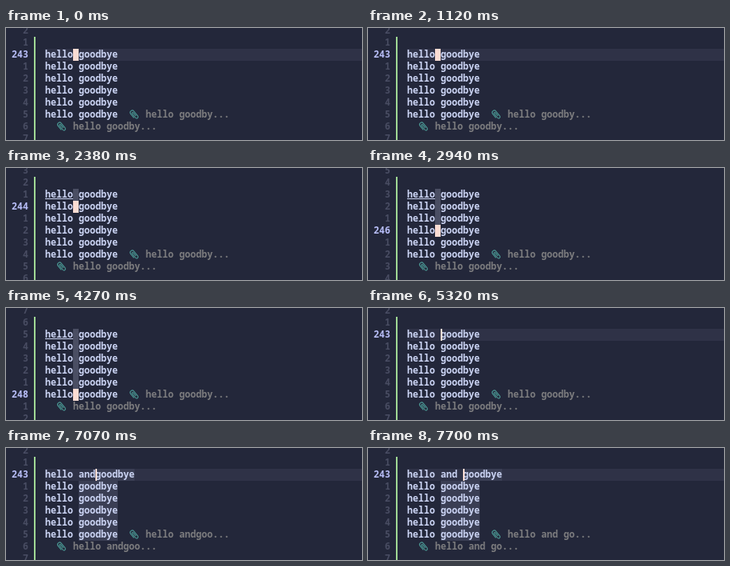
Animation of 446x140 px, one loop 8 s. Source, as an HTML page with a canvas:

```html
<!DOCTYPE html>
<html lang="en">
<head>
<meta charset="utf-8">
<title>Block insert</title>
<style>
html, body { margin: 0; width: 446px; height: 140px; overflow: hidden; background: #23273a; }
canvas { display: block; }
</style>
</head>
<body>
<canvas id="stage" width="446" height="140"></canvas>
<script>
const ctx = document.getElementById('stage').getContext('2d');
const CELL = 7, ROW = 15, LEFT = 49, TOP = 26, LOOP = 8000;
const BLOCK_MODE = 1540, INSERT_MODE = 5320, WORD_MARK = 5530;
const MOVES = [2170, 2450, 2730, 3010, 3150];
const KEYS = [6370, 6650, 6930, 7210];
const color = {
  bg: '#23273a', line: '#2f3247', mark: '#3a3e54', select: '#4a4e63',
  text: '#cdd6f6', dim: '#494d63', number: '#b9bffa', note: '#7d7d7f',
  cursor: '#fbdcd3', green: '#a0d995', clip: '#4b9995'
};

const colX = col => LEFT + col * CELL;
const rowY = row => TOP + row * ROW;
const countBefore = (times, t) => times.filter(time => time <= t).length;

function cells(col, row, count, fill) {
  ctx.fillStyle = fill;
  ctx.fillRect(colX(col), rowY(row), count * CELL, ROW);
}

function write(text, col, row, fill) {
  ctx.fillStyle = fill;
  ctx.fillText(text, colX(col), rowY(row) + 11);
}

function paperclip(col, row) {
  ctx.save();
  ctx.translate(colX(col) + 6.5, rowY(row) + 7.5);
  ctx.rotate(-Math.PI / 4.6);
  ctx.strokeStyle = color.clip;
  ctx.lineWidth = 1.1;
  ctx.stroke(new Path2D('M-2.6 3V-3.6A2.6 2.6 0 0 1 2.6 -3.6V4A1.8 1.8 0 0 1 -1 4V-2.6A.9 .9 0 0 1 .9 -2.6V2.6'));
  ctx.restore();
}

function note(text, col, row) {
  paperclip(col, row);
  write(text.slice(0, 12) + '...', col + 3, row, color.note);
}

function draw(t) {
  const inserting = t >= INSERT_MODE;
  const selecting = t >= BLOCK_MODE && !inserting;
  const current = inserting ? 0 : countBefore(MOVES, t);
  const typed = 'and '.slice(0, countBefore(KEYS, t));
  const edited = 'hello ' + typed + 'goodbye';

  ctx.fillStyle = color.bg;
  ctx.fillRect(0, 0, 446, 140);
  ctx.fillStyle = color.green;
  ctx.fillRect(35, 11, 2, 129);
  if (!selecting) cells(0, current, 60, color.line);

  for (let row = -2; row < 8; row++) {
    const here = row === current;
    const label = String(here ? 243 + row : Math.abs(row - current));
    write(label, -3 - label.length, row, here ? color.number : color.dim);
    if (row < 0 || row > 5) continue;
    if (t >= WORD_MARK) cells(row ? 6 : 6 + typed.length, row, 7, color.mark);
    if (selecting && row < current) cells(5, row, 1, color.select);
    write(row ? 'hello goodbye' : edited, 0, row, color.text);
  }
  note(edited, 15, 5);
  note(edited, 2, 6);

  if (selecting && current) {
    ctx.fillStyle = color.text;
    ctx.fillRect(LEFT, TOP + 12, 5 * CELL, 1);
  }
  if (inserting) {
    ctx.fillStyle = color.cursor;
    ctx.fillRect(colX(6 + typed.length), TOP, 2, ROW);
  } else {
    cells(5, current, 1, color.cursor);
  }
}

ctx.font = 'bold 11.667px "Noto Sans Mono", "DejaVu Sans Mono", monospace';
const start = performance.now();
function tick() {
  draw((performance.now() - start) % LOOP);
  requestAnimationFrame(tick);
}
tick();
</script>
</body>
</html>
```
